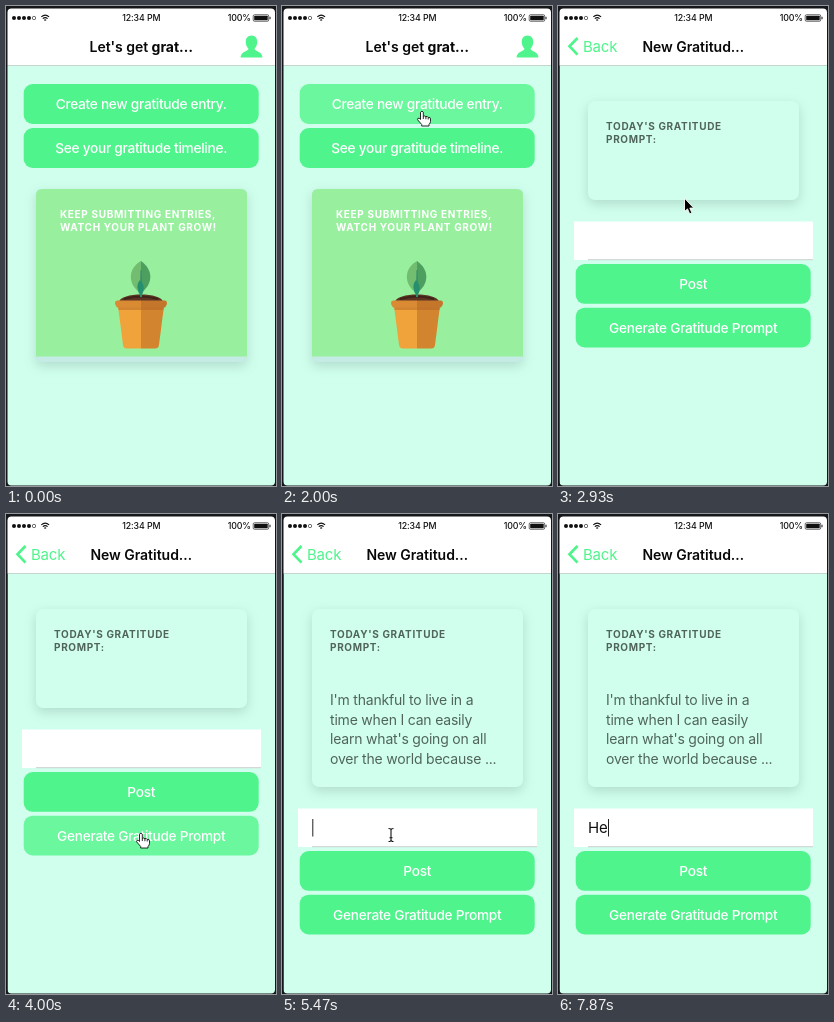
Write an HTML page that moves like this. It is 270 by 480 pixels and loops after 8 s.

```html
<!DOCTYPE html>
<html lang="en">
<head>
<meta charset="utf-8">
<title>Gratitude journal</title>
<style>
  html, body { margin: 0; width: 100%; height: 100%; overflow: hidden; background: #111; }
  svg { display: block; width: 100vw; height: 100vh; font-family: Inter, "Noto Sans", sans-serif; }
  text { white-space: pre; }
  .mid { text-anchor: middle; }
  .title { font-size: 14px; font-weight: 600; letter-spacing: -.03px; fill: #080808; }
  .title tspan { font-weight: 700; }
  .button rect { fill: #50f48c; }
  .button text { font-size: 13.7px; font-weight: 500; letter-spacing: -.29px; fill: #fff; text-anchor: middle; }
  .label { font-size: 10px; font-weight: 700; letter-spacing: .66px; }
  .prompt { font-size: 14px; letter-spacing: -.2px; fill: #50645c; }
  .status { font-size: 8.8px; font-weight: 500; letter-spacing: -.1px; fill: #111; }
  .shadow { filter: drop-shadow(0 4px 6px rgba(40, 70, 70, .19)); }
  .page { fill: #d0ffed; }
  .back { font-size: 15px; letter-spacing: -.2px; fill: #50f48c; }
</style>
</head>
<body>
<svg viewBox="0 0 270 480" preserveAspectRatio="none">
  <rect width="270" height="480" fill="#111"/>

  <g id="home">
    <rect class="page" y="59" width="270" height="421"/>
    <g class="button" id="create">
      <rect x="17.700" y="78" width="235" height="40" rx="9"/>
      <text x="135.200" y="103">Create new gratitude entry.</text>
    </g>
    <g class="button" id="timeline">
      <rect x="17.700" y="122" width="235" height="40" rx="9"/>
      <text x="135.200" y="147">See your gratitude timeline.</text>
    </g>
    <g class="shadow">
      <rect x="30" y="183" width="211" height="173" rx="6" fill="#c4ebe4"/>
      <path d="M30 350.500V189q0-6 6-6H235q6 0 6 6V350.500Z" fill="#98f09f"/>
    </g>
    <g class="label" fill="#fff">
      <text x="54" y="212">KEEP SUBMITTING ENTRIES,</text>
      <text x="54" y="225">WATCH YOUR PLANT GROW!</text>
    </g>
    <g id="plant">
      <path d="M113 296C114 286 156 286 157 296Z" fill="#5b3423"/>
      <path d="M118 293q17-5 34 0" fill="none" stroke="#402318" stroke-width="2"/>
      <path d="M135 255C121 263 122 279 134.500 287Z" fill="#73bd70"/>
      <path d="M135 255C148 264 147 279 134.500 287Z" fill="#4d9f60"/>
      <path d="M134.500 264L134 291H136L135.500 264Z" fill="#348966"/>
      <path d="M135 291Q128 280 134 274Q141 281 135 291Z" fill="#26906e"/>
      <path d="M112 300H135V342.500H121Q117.500 342.500 117 339Z" fill="#f0a33b"/>
      <path d="M158 300H135V342.500H149Q152.500 342.500 153 339Z" fill="#d3842f"/>
      <path d="M112 300H158L157.500 304H112.500Z" fill="#aa6024" opacity=".45"/>
      <path d="M135 294.500H111Q109 294.500 109 297T111 301.500H135Z" fill="#d98a32"/>
      <path d="M135 294.500H159Q161 294.500 161 297T159 301.500H135Z" fill="#c4762b"/>
    </g>
  </g>

  <g id="entry">
    <rect class="page" x="1.500" y="59" width="270" height="421"/>
    <rect id="card" class="page shadow" x="30" y="95" width="211" height="99" rx="7"/>
    <g class="label" fill="#50645c">
      <text x="48" y="124">TODAY'S GRATITUDE</text>
      <text x="48" y="137">PROMPT:</text>
    </g>
    <g class="prompt" id="prompt">
      <text x="48" y="191">I'm thankful to live in a</text>
      <text x="48" y="210.700">time when I can easily</text>
      <text x="48" y="230.300">learn what's going on all</text>
      <text x="48" y="250">over the world because ...</text>
    </g>
    <g id="form">
      <rect x="16" y="215.500" width="239" height="38.500" fill="#fff"/>
      <path d="M30 253.700H255" stroke="#b9c4c0" stroke-width=".8"/>
      <text id="typed" x="30" y="240" font-size="15" letter-spacing="-.1" fill="#111"></text>
      <rect id="caret" y="226" width="1" height="17.500" fill="#222"/>
      <g class="button" id="post">
        <rect x="17.700" y="258" width="235" height="39.800" rx="9"/>
        <text x="135.200" y="282.800">Post</text>
      </g>
      <g class="button" id="generate">
        <rect x="17.700" y="301.700" width="235" height="39.800" rx="9"/>
        <text x="135.200" y="326.600">Generate Gratitude Prompt</text>
      </g>
    </g>
  </g>

  <rect width="270" height="59.500" fill="#fff"/>
  <path d="M0 59.500H270" stroke="#b7c3be" stroke-width=".7"/>
  <g id="homeBar">
    <text id="homeTitle" class="title mid" x="135.300" y="45.500">Let's get <tspan>grat…</tspan></text>
    <path id="person" fill="#50f48c" d="M245.500 29.500c4 0 6 3 5.700 7-.2 3-1.300 4.800-2.700 6.200 0 2.500 7.500 2.300 8 8.800H234.500c.5-6.500 8-6.300 8-8.800-1.400-1.400-2.500-3.200-2.700-6.200-.3-4 1.700-7 5.700-7Z"/>
  </g>
  <g id="entryBar">
    <text id="entryTitle" class="title mid" x="135.300" y="45.500">New Gratitud…</text>
    <path d="M19.500 32L11.500 40.300L19.500 48.600" fill="none" stroke="#50f48c" stroke-width="2.700"/>
    <text id="back" class="back" x="25" y="45.700">Back</text>
  </g>

  <g id="statusBar">
    <g fill="#111">
      <circle cx="8" cy="12" r="2"/><circle cx="13" cy="12" r="2"/>
      <circle cx="18" cy="12" r="2"/><circle cx="23" cy="12" r="2"/>
    </g>
    <circle cx="28" cy="12" r="1.700" fill="none" stroke="#111" stroke-width=".6"/>
    <path d="M35.300 10.800q3.900-3.400 7.800 0M36.800 12.600q2.400-2 4.800 0M38.300 14.300q.9-.8 1.800 0" fill="none" stroke="#111" stroke-width="1.100"/>
    <text class="status mid" x="135.300" y="15.200">12:34 PM</text>
    <text class="status" x="245" y="15.200" text-anchor="end">100%</text>
    <rect x="247.200" y="8.700" width="15.500" height="6.600" rx="1.300" fill="none" stroke="#111" stroke-width=".6"/>
    <rect x="248.200" y="9.700" width="13.500" height="4.600" rx=".6" fill="#111"/>
    <path d="M264 10.800v2.400" stroke="#111"/>
  </g>

  <path fill="#15171a" fill-rule="evenodd" d="M0 0H270V480H0ZM5.500 2.500Q1.500 2.500 1.500 6.500V475.500Q1.500 479.500 5.500 479.500H265Q269 479.500 269 475.500V6.500Q269 2.500 265 2.500Z"/>

  <g id="pointer">
    <path id="arrow" d="M0 0V13.300L3 10.700L5.200 15.700L7.400 14.700L5.300 9.900H9.300Z" fill="#000" stroke="#fff" stroke-width=".9"/>
    <path id="hand" d="M-1.500 1.200Q0-1 1.300 1.200V5.500Q2.800 4.300 3.900 5.700Q5.400 4.800 6.200 6.400Q8.500 5.700 8.500 8V10.500Q8.500 12 7 13.500V15H-.3V13.500L-4.500 8.700Q-4.500 6.800-2.800 7.200L-1.500 8.500Z M1.300 5.500V8M3.900 5.700V8.200M6.200 6.400V8.500" fill="#fff" stroke="#111" stroke-width=".9" stroke-linejoin="round"/>
    <path id="beam" d="M-2.500-6.500Q0-6.500 0-5Q0-6.500 2.500-6.500M0-5V5M-2.500 6.500Q0 6.500 0 5Q0 6.500 2.500 6.500M-1.500 2.800H1.500" fill="none" stroke="#111" stroke-width="1.100"/>
  </g>
</svg>
<script>
const LOOP = 8000;
const PUSH = 2282, PUSH_TIME = 500;
const EXPAND = 4340, GROWTH = 79;
const FOCUS = 5470, BLINK = 500;
const PRESS_FADE = 100, PRESS_HOLD = 210;
const TYPING = [[7670, 'H'], [7870, 'He']];
const GREEN = [80, 244, 140], LIGHT = [106, 247, 157], BLUE = [74, 127, 219];

// time, x, y, pointer shape from that moment on
const PATH = [
  [270, 150, 357, 'arrow'], [1200, 146, 209, 'arrow'], [1470, 146, 209, 'arrow'],
  [1720, 143, 162, 'hand'], [2000, 140, 105, 'hand'], [2282, 140, 104, 'arrow'],
  [2470, 140.5, 102, 'arrow'], [2930, 126.5, 192, 'arrow'], [3050, 128, 216, 'beam'],
  [3230, 131, 258, 'hand'], [3470, 135, 313, 'hand'], [3800, 135, 313, 'hand'],
  [4200, 135, 325, 'hand'], [EXPAND, 135, 325, 'beam'], [4870, 135, 325, 'beam'],
  [4970, 131, 337, 'hand'], [5130, 122, 352, 'hand'], [5270, 114, 337, 'beam'],
  [5400, 109, 321, 'beam'], [6470, 109, 321, 'beam'], [6870, 132, 291, 'arrow'],
  [7100, 143, 275, 'arrow'], [7670, 143, 275, 'none']
];

const el = Object.fromEntries([...document.querySelectorAll('[id]')].map(e => [e.id, e]));
const clamp = v => Math.min(1, Math.max(0, v));
const ramp = (t, from, to) => clamp((t - from) / (to - from));
const mix = (a, b, p) => a + (b - a) * p;
const show = (e, on) => { e.style.display = on ? '' : 'none'; };
const shift = (e, x, y = 0) => e.setAttribute('transform', `translate(${x} ${y})`);

// cubic-bezier(.36, .66, .04, 1)
function pushEase(p) {
  if (p <= 0 || p >= 1) return clamp(p);
  const curve = (a, b, s) => 3 * (1 - s) ** 2 * s * a + 3 * (1 - s) * s * s * b + s ** 3;
  let low = 0, high = 1;
  for (let i = 0; i < 20; i++) {
    const s = (low + high) / 2;
    if (curve(.36, .04, s) < p) low = s; else high = s;
  }
  return curve(.66, 1, low);
}

function pointerAt(t) {
  const i = PATH.findLastIndex(k => k[0] <= t);
  if (i < 0) return { x: 0, y: 0, shape: 'none' };
  const [from, x, y, shape] = PATH[i];
  const [to, nextX, nextY] = PATH[i + 1] || [LOOP, x, y];
  const p = ramp(t, from, to);
  return { x: mix(x, nextX, p), y: mix(y, nextY, p), shape };
}

function drawPush(t) {
  const p = pushEase(ramp(t, PUSH, PUSH + PUSH_TIME));
  const entering = t >= PUSH;
  show(el.home, p < 1);
  show(el.homeBar, p < 1);
  show(el.entry, entering);
  show(el.entryBar, entering);
  shift(el.home, -89 * p);
  el.home.style.opacity = 1 - .2 * p;
  shift(el.entry, 270 * (1 - p));
  shift(el.homeTitle, -89 * p);
  el.homeBar.style.opacity = (1 - p) ** 2;
  shift(el.entryTitle, 270 * (1 - p));
  shift(el.back, 100 * (1 - p));
  el.entryBar.style.opacity = p;
}

function drawEntry(t) {
  const open = t >= EXPAND;
  show(el.prompt, open);
  el.card.setAttribute('height', open ? 99 + GROWTH : 99);
  shift(el.form, 0, open ? GROWTH : 0);

  const text = TYPING.findLast(k => k[0] <= t)?.[1] || '';
  el.typed.textContent = text;
  el.caret.setAttribute('x', 30.3 + (text ? el.typed.getComputedTextLength() : 0));
  show(el.caret, t >= FOCUS && (text || Math.floor((t - FOCUS) / BLINK) % 2 === 0));
}

function paintButton(button, t, hover, press = Infinity) {
  const release = press + PRESS_HOLD;
  const blue = t < press ? 0
    : ramp(t, press, press + PRESS_FADE) * (1 - ramp(t, release, release + PRESS_FADE));
  const base = hover ? LIGHT : GREEN;
  const color = base.map((c, i) => mix(c, BLUE[i], blue));
  button.firstElementChild.style.fill = `rgb(${color.join(' ')})`;
}

function drawPointer(t) {
  const { x, y, shape } = pointerAt(t);
  shift(el.pointer, x, y);
  for (const name of ['arrow', 'hand', 'beam']) show(el[name], name === shape);

  const over = (top, bottom) => shape === 'hand' && y >= top && y <= bottom;
  const onHome = t < PUSH;
  const postTop = t < EXPAND ? 258 : 258 + GROWTH;
  paintButton(el.create, t, onHome && over(78, 118), 2130);
  paintButton(el.timeline, t, onHome && over(122, 162));
  paintButton(el.post, t, !onHome && over(postTop, postTop + 40));
  paintButton(el.generate, t, !onHome && over(postTop + 44, postTop + 84), 4230);
}

function draw(now) {
  const t = now % LOOP;
  drawPush(t);
  drawEntry(t);
  drawPointer(t);
}

const start = performance.now();
function tick() {
  draw(performance.now() - start);
  requestAnimationFrame(tick);
}
tick();
</script>
</body>
</html>
```
